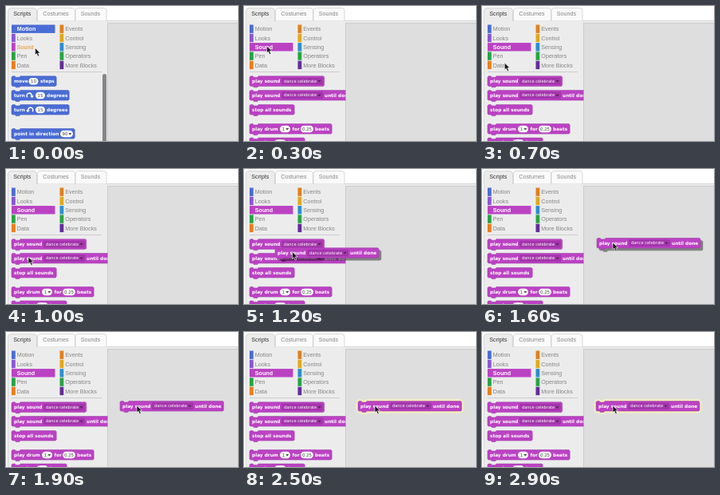
Write an HTML page that moves like this. It is 291 px wide and 169 px high and loops after 3500 ms.

```html
<!DOCTYPE html>
<html lang="en">
<head>
<meta charset="utf-8">
<title>Dragging a sound block</title>
<style>
  html, body { margin: 0; width: 100%; height: 100%; overflow: hidden; background: #fff; }
  svg { display: block; width: 100%; height: 100%; }
  text { white-space: pre; }
  .ui { font: 7.2px "Liberation Sans", Arial, sans-serif; fill: #858585; }
  .active { fill: #333; }
  .hover { fill: #ee8b1a; }
  .chosen { fill: #fff; font-weight: bold; }
  .label { font: bold 5.8px "DejaVu Sans", sans-serif; fill: #fff; }
  .menu { font: 5.1px "DejaVu Sans", sans-serif; fill: #fff; }
  .value { font: 5.4px "DejaVu Sans", sans-serif; fill: #444; text-anchor: middle; }
  .lifted { filter: drop-shadow(3px 3px .5px rgba(0, 0, 0, .42)); }
  .glowing {
    filter: drop-shadow(0 0 1px #fff9b4) drop-shadow(0 0 1px #fff9b4) drop-shadow(0 0 1.2px #fff9b4);
  }
</style>
</head>
<body>
<svg id="stage" viewBox="0 0 291 169"></svg>
<script>
const LOOP = 3500;
const BLUE = '#4a6cd4', PURPLE = '#bb42c3';

const rect = (x, y, w, h, fill, extra = '') =>
  `<rect x="${x}" y="${y}" width="${w}" height="${h}" fill="${fill}" ${extra}/>`;
const path = (d, fill, extra = '') => `<path d="${d}" fill="${fill}" ${extra}/>`;
const text = (x, y, string, style) => `<text x="${x}" y="${y}" class="${style}">${string}</text>`;
const group = (id, content, extra = '') => `<g id="${id}" ${extra}>${content}</g>`;

// Block parts take the vertical centre of their block.
const label = (x, string) => cy => text(x, cy + 1.9, string, 'label');
const arrow = (x, cy, fill) => path(`M${x - 2} ${cy - 1}h4l-2 2.5z`, fill);
const value = (x, w, string, hasMenu) => cy =>
  rect(x, cy - 4.2, w, 8.4, '#fff', 'rx="4.2"') +
  text(x + w / 2 - (hasMenu ? 2 : 0), cy + 1.9, string, 'value') +
  (hasMenu ? arrow(x + w - 3.7, cy, '#444') : '');
const menu = (x, w, string) => cy =>
  rect(x, cy - 4.2, w, 8, '#a436ac', 'stroke="#97319f" stroke-width=".5"') +
  text(x + 2.5, cy + 1.4, string, 'menu') + arrow(x + w - 4, cy - .3, '#512055');
const turnIcon = (x, flip) => cy =>
  `<g transform="translate(${x} ${cy}) scale(${flip} 1)">` +
  path('M-3.3 2.2A3.2 3.2 0 1 1 2.5 .5', 'none', 'stroke="#fff" stroke-width="1.5"') +
  path('M.2 .2h4.8l-2.3 3z', '#fff') + '</g>';

function block(cy, width, color, edge, parts) {
  const outline = `M7 ${cy - 5.3}l1.2 -1.2h3l1.2 1.4h4.4l1.2 -1.4H${6 + width}l1.2 1.2` +
    `v10.2l-1.2 1.2H18l-1.2 1.4h-4.4l-1.2 -1.4H8.2l-1.2 -1.2z`;
  return path(outline, color, `stroke="${edge}" stroke-width=".5"`) +
    parts.map(part => part(cy)).join('');
}
const motion = (cy, width, ...parts) => block(cy, width, BLUE, '#3a56b4', parts);
const sound = (cy, width, ...parts) => block(cy, width, PURPLE, '#973a9e', parts);

const playUntilDone = sound(112, 129.8,
  label(10, 'play sound'), menu(47.5, 51, 'dance celebrate'), label(101, 'until done'));

const motionBlocks =
  motion(94.3, 56, label(10, 'move'), value(28.5, 12, '10'), label(43, 'steps')) +
  motion(112, 72, label(10, 'turn'), turnIcon(30, 1), value(37, 12, '15'), label(51, 'degrees')) +
  motion(130, 72, label(10, 'turn'), turnIcon(30, -1), value(37, 12, '15'), label(51, 'degrees')) +
  motion(160, 79, label(10, 'point in direction'), value(68, 16, '90', true)) +
  rect(121, 85, 5, 90, '#858688', 'rx="2.5"');

const soundBlocks =
  sound(94.3, 93.5, label(10, 'play sound'), menu(47.5, 51, 'dance celebrate')) +
  playUntilDone +
  sound(130, 56, label(10, 'stop all sounds')) +
  sound(154, 103, label(10, 'play drum'), value(45, 13, '1', true),
    label(60.5, 'for'), value(71, 16, '0.25'), label(89, 'beats')) +
  sound(171.5, 69, label(10, 'rest for'), value(38, 15, '0.25'), label(55, 'beats'));

const categories = [
  ['Motion', BLUE], ['Looks', '#8a55d7'], ['Sound', PURPLE], ['Pen', '#25a542'], ['Data', '#ee7d16'],
  ['Events', '#e0801c'], ['Control', '#e1a91a'], ['Sensing', '#2c8ed0'],
  ['Operators', '#25a542'], ['More Blocks', '#632d99']
];

const categoryList = (chosen, hovered) => categories.map(([name, color], i) => {
  const x = i < 5 ? 7 : 67.5, y = 23.5 + (i % 5) * 11.3;
  const style = name === chosen ? 'chosen' : name === hovered ? 'hover' : '';
  return rect(x, y, name === chosen ? 54.5 : 4.8, 10.4, color) +
    text(x + 6.8, y + 7.8, name, 'ui ' + style);
}).join('');

const tab = (x, w, name, active) =>
  path(`M${x} 18.5V6q0 -3.5 3.5 -3.5h${w - 7}q3.5 0 3.5 3.5v12.5`,
    active ? '#ececed' : '#fafafa', 'stroke="#cfcfcf" stroke-width=".8"') +
  text(x + 6.8, 12.1, name, 'ui ' + (active ? 'active' : ''));

const stage = document.getElementById('stage');
stage.innerHTML =
  '<clipPath id="pane"><path d="M0 0h127.5v169H0z"/></clipPath>' +
  rect(2.5, 18.5, 300, 160, '#ececed', 'stroke="#cfcfcf" stroke-width=".8"') +
  tab(2.5, 36, 'Scripts', true) + tab(39.5, 47, 'Costumes') + tab(87, 39, 'Sounds') +
  rect(3, 18, 35, 2, '#ececed') +
  rect(127.5, 21.5, 170, 155, '#dedede', 'stroke="#c6c6c6" stroke-width=".8"') +
  rect(7, 82, 113, .8, '#c6c6c6') +
  group('motionPane', categoryList('Motion', 'Sound') + motionBlocks) +
  group('soundPane', categoryList('Sound') + soundBlocks, 'clip-path="url(#pane)"') +
  group('dragged', playUntilDone) +
  group('cursor', path('M0 0v8.8l2 -1.8 1.6 3.6 1.7 -.7 -1.5 -3.5h2.7z', '#1a1a1a',
    'stroke="#fff" stroke-width=".6"'));

const [motionPane, soundPane, dragged, cursor] =
  ['motionPane', 'soundPane', 'dragged', 'cursor'].map(id => document.getElementById(id));

const show = (element, visible) => element.setAttribute('display', visible ? 'inline' : 'none');
const move = (element, [x, y]) => element.setAttribute('transform', `translate(${x} ${y})`);

// Each key is [time, x, y].
function along(keys, t) {
  const next = keys.findIndex(key => key[0] > t);
  if (next < 0) return keys[keys.length - 1].slice(1);
  const [t0, x0, y0] = keys[next - 1], [t1, x1, y1] = keys[next];
  const p = (t - t0) / (t1 - t0), eased = p * p * (3 - 2 * p);
  return [x0 + (x1 - x0) * eased, y0 + (y1 - y0) * eased];
}

const cursorKeys = [
  [0, 36.5, 52.5], [100, 28.5, 50], [500, 28.5, 50], [1000, 28, 110], [1100, 28, 110],
  [1400, 153.5, 85], [1600, 164, 92]
];
const dragKeys = [
  [0, 0, 0], [1100, 0, 0], [1400, 123.5, -26], [1600, 137, -19], [1700, 137, -19], [1800, 136, -19]
];

function draw(now) {
  const t = Math.floor((now % LOOP) / 100) * 100;
  show(motionPane, t < 300);
  show(soundPane, t >= 300);
  show(dragged, t >= 1200);
  move(dragged, along(dragKeys, t));
  dragged.setAttribute('class', t < 1800 ? 'lifted' : t >= 2500 ? 'glowing' : '');
  move(cursor, along(cursorKeys, t));
}

let start;
function tick(now) {
  start ??= now;
  draw(now - start);
  requestAnimationFrame(tick);
}
draw(0);
requestAnimationFrame(tick);
</script>
</body>
</html>
```
